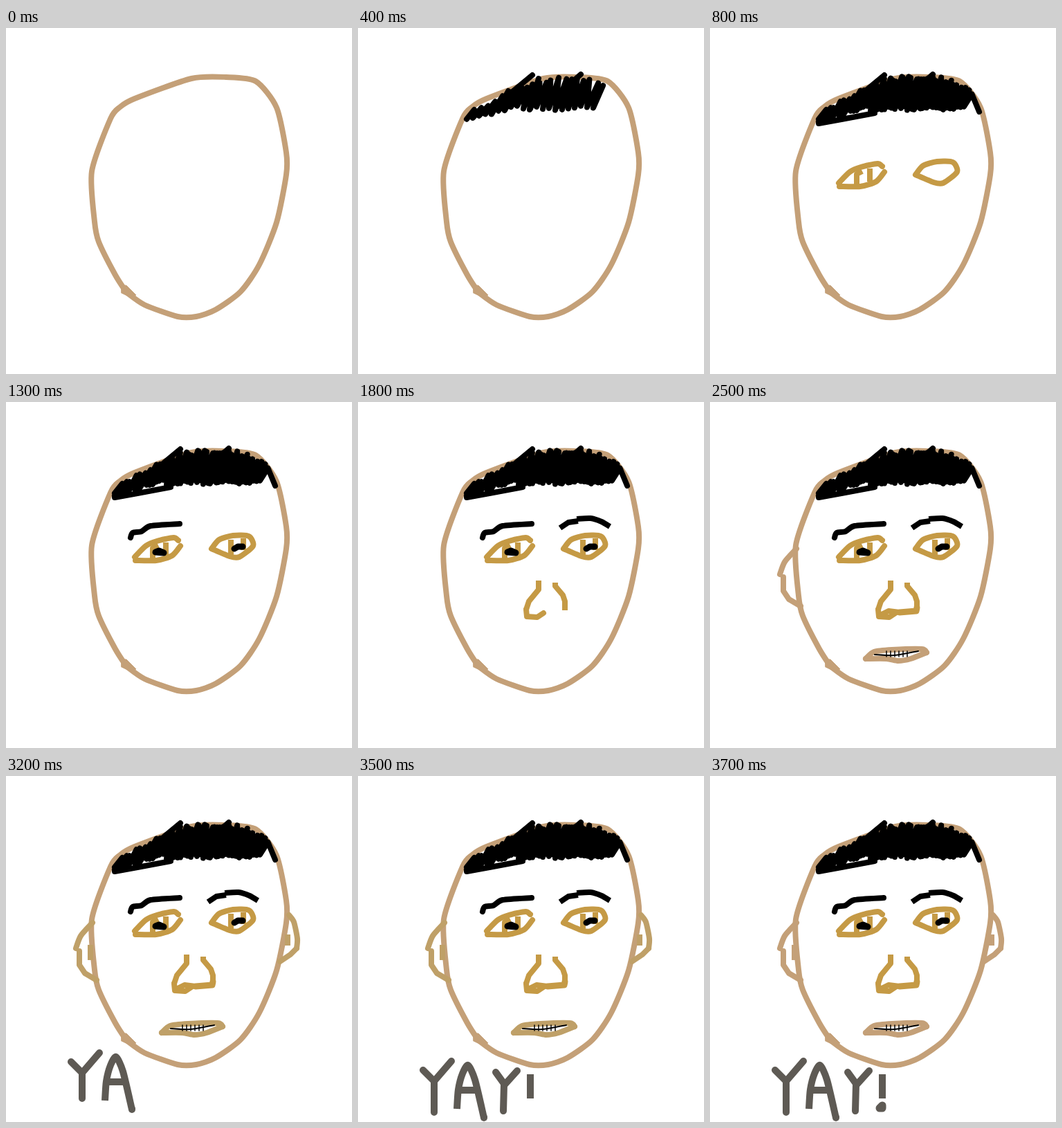
Animation of 500x500 px, one loop 3.9 s. Source, as an HTML page with a canvas:

```html
<!DOCTYPE html>
<html lang="en">
<head>
<meta charset="utf-8">
<title>Drawing a face</title>
<style>
html, body { margin: 0; width: 100%; height: 100%; overflow: hidden; background: #fff }
canvas { display: block; width: 500px; height: 500px }
</style>
</head>
<body>
<canvas id="stage" width="500" height="500"></canvas>
<script>
const ctx = document.getElementById('stage').getContext('2d');
const LOOP = 3900, STEP = 100;
const SKIN = '#c4a078', DULL = '#bfa068', GOLD = '#c59a45', INK = '#000', GRAY = '#5e5a54';
const strokes = [];

// Adds a stroke that shows from one step until another.
function add(from, color, path, opts) {
  strokes.push({ from, color, path: new Path2D(path), until: 99, width: 8, cap: 'round', dy: 0, ...opts });
}

// Smooth path through a few key points, given as "x y x y ..."
function curve(text) {
  const n = text.split(' ').map(Number), p = [];
  for (let i = 0; i < n.length; i += 2) p.push([n[i], n[i + 1]]);
  const at = i => p[Math.max(0, Math.min(p.length - 1, i))];
  const handle = (i, side) => at(i).map((v, k) => v + side * (at(i + 1)[k] - at(i - 1)[k]) / 8);
  return 'M' + p[0] + p.slice(1).map((q, i) => `C${handle(i, 1)} ${handle(i + 1, -1)} ${q}`).join('');
}

// Seeded zigzag between the hairline and the crown
let seed = 7;
const rand = () => (seed = seed * 16807 % 2147483647) / 2147483647;
const hairline = x => 119 + Math.max(0, 215 - x) * 0.33;
const crown = x => 70 + Math.max(0, 258 - x) * 0.5 + Math.max(0, x - 340) * 0.45;

function scribble(from, to, gap) {
  const points = [];
  for (let x = from; x <= to; x += gap) {
    const tip = x + 11 + rand() * 6;
    points.push([x, hairline(x) - rand() * 7], [tip, crown(tip) + rand() * 10]);
  }
  return 'M' + points.join('L');
}

// Head
add(0, SKIN, curve('174 382 158 357 134 309 128 280 124 207 151 131 165 114 186 102 268 73 318 71 361 77 391 115 405 180 405 212 391 281 366 342 339 381 303 407 275 417 248 417 200 400 174 382'));
add(0, SKIN, 'M167 372H174L188 386 178 388 167 383Z', { width: 1, fill: true });

// Hair: a loose first pass, then a dense one
for (let i = 0; i < 4; i++) add(i + 1, INK, scribble(157 + i * 46, 203 + i * 46, 9));
add(3, INK, 'M205 107 252 68M290 95 322 67');
add(5, INK, scribble(157, 370, 5) + 'L389 121M157 138 190 132 238 123');

// Eyes
add(6, GOLD, curve('249 200 242 196 218 201 202 208 186 224') + curve('187 229 217 229 240 222 252 208'));
add(8, GOLD, curve('297 212 308 199 328 193 351 194 357 208 337 224 323 223 297 212'));
add(7, GOLD, 'M212 232V211L220 207M231 203V222', { cap: 'butt' });
add(9, GOLD, 'M325 199V221M343 197V214', { cap: 'butt' });
add(10, INK, 'M216 217 221 215 228 218Z', { width: 9 });
add(11, INK, 'M330 212 335 209 342 209', { width: 9 });

// Brows
add(12, INK, curve('180 196 183 189 196 187 209 179 251 176'));
add(14, INK, 'M292 182 304 174 318 172', { cap: 'butt' });
add(15, INK, curve('316 169 336 168 352 173 364 180'), { cap: 'butt' });

// Nose
add(16, GOLD, 'M261 258V271L247 288 243 300', { cap: 'butt' });
add(17, GOLD, 'M243 300 244 310 259 311 268 305');
add(18, GOLD, 'M285 261V266L296 279 299 288V301', { cap: 'butt' });
add(19, GOLD, 'M299 297 298 302 274 304', { width: 9 });
add(20, GOLD, 'M274 304 258 302 246 308');

// Mouth and teeth
add(21, SKIN, curve('225 371 237 361 263 358 306 357 313 362'), { tint: true });
add(22, SKIN, curve('313 362 290 371 272 374 255 371 225 371'), { tint: true });
add(23, INK, curve('238 365 267 366 301 360'), { width: 2 });
for (let x = 255; x <= 290; x += 6) add(24, INK, `M${x} 360V368`, { width: 1.5 });

// Ears
add(25, SKIN, curve('125 212 108 231 101 249'), { tint: true });
add(25, SKIN, 'M106 253V273L114 285 131 295', { tint: true });
add(26, SKIN, 'M122 244V266', { cap: 'butt', tint: true });
add(27, SKIN, curve('409 201 416 211 421 235 420 249'), { tint: true });
add(28, SKIN, 'M420 249 411 258 396 268', { tint: true });
add(29, SKIN, 'M407 229V245', { cap: 'butt', tint: true });

// Lettering: the first two letters start higher, then settle lower
function letters(first, second, until, dy, foot) {
  const opts = { until, dy, width: 10 };
  add(first, GRAY, `M94 413 110 429 135 400M110 429V${foot}`, opts);
  add(second, GRAY, curve('143 469 145 441 151 418 159 406 169 427 182 482') + 'M147 442H170', { ...opts, cap: 'butt' });
  add(second, GRAY, 'M182 481V482', opts);
}
letters(31, 32, 33, 0, 466);
letters(33, 33, 99, 12, 474);
add(33, GRAY, 'M199 428 212 446 230 426', { width: 10 });
add(34, GRAY, 'M211 446 210 484', { width: 10 });
add(35, GRAY, 'M249 431V466', { width: 10, cap: 'butt' });
add(36, GRAY, 'M245 480 249 476V480Z', { width: 11 });

function draw(step) {
  ctx.fillStyle = '#fff';
  ctx.fillRect(0, 0, 500, 500);
  ctx.lineJoin = 'round';
  for (const s of strokes) {
    if (step < s.from || step >= s.until) continue;
    const dull = s.tint && step > 30 && step < 37;
    ctx.strokeStyle = ctx.fillStyle = dull ? DULL : s.color;
    ctx.lineWidth = s.width;
    ctx.lineCap = s.cap;
    ctx.setTransform(1, 0, 0, 1, 0, s.dy);
    if (s.fill) ctx.fill(s.path);
    ctx.stroke(s.path);
  }
  ctx.resetTransform();
}

const start = performance.now();
function tick(now) {
  draw(Math.floor(Math.max(0, now - start) % LOOP / STEP));
  requestAnimationFrame(tick);
}
draw(0);
requestAnimationFrame(tick);
</script>
</body>
</html>
```
